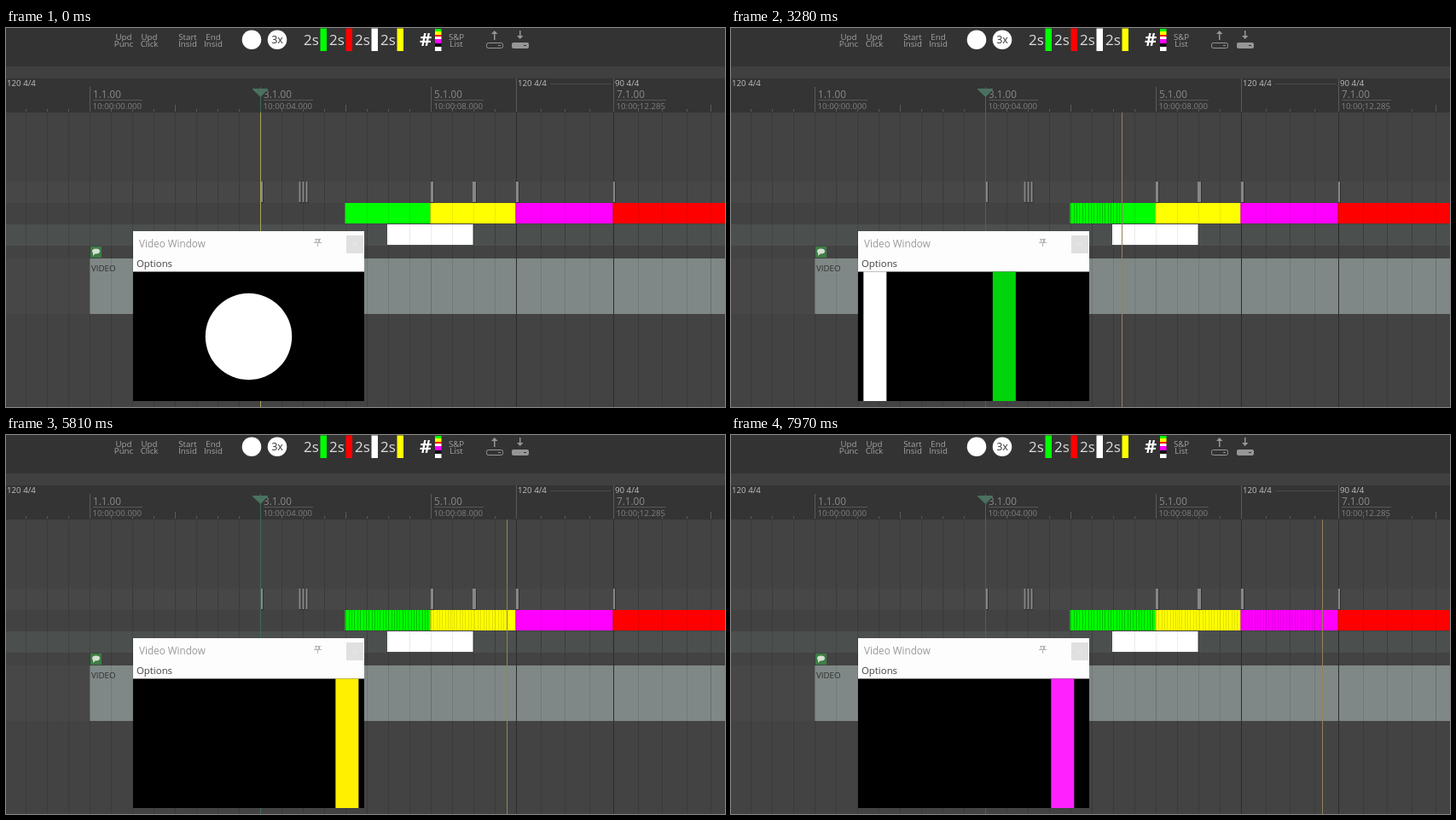
An HTML page with a canvas that plays this animation: 843x444 px, repeating every 8 s.

```html
<!DOCTYPE html>
<html>
<head>
<meta charset="utf-8">
<style>
  html, body { margin: 0; width: 100%; height: 100%; overflow: hidden; background: #434343; }
  canvas { display: block; }
</style>
</head>
<body>
<canvas id="stage" width="843" height="444"></canvas>
<script>
const ctx = document.getElementById('stage').getContext('2d');
const LOOP = 8000, FPS = 15;
const FONT = '"Open Sans", "Noto Sans", sans-serif';

function rect(x, y, w, h, color) {
  ctx.fillStyle = color;
  ctx.fillRect(x, y, w, h);
}
function disc(x, y, r, color) {
  ctx.fillStyle = color;
  ctx.beginPath();
  ctx.arc(x, y, r, 0, Math.PI * 2);
  ctx.fill();
}
function shape(points, color) {
  ctx.fillStyle = color;
  ctx.beginPath();
  points.forEach(([x, y]) => ctx.lineTo(x, y));
  ctx.fill();
}
function text(str, x, y, size, color, align = 'left', weight = 400) {
  ctx.font = `${weight} ${size}px ${FONT}`;
  ctx.textAlign = align;
  ctx.fillStyle = color;
  ctx.fillText(str, x, y);
}

// Beats are 25 px apart at 120 bpm, then 28.5 px after the tempo change.
const beats = [];
for (let i = -3; i < 20; i++) beats.push({ x: 98 + i * 25, bar: i % 4 === 0 });
for (let i = 0; i < 9; i++) beats.push({ x: Math.round(598 + i * 28.5), bar: i % 4 === 0 });

const clips = [
  [398, 100, '#00ff00'], [498, 100, '#ffff00'],
  [598, 114, '#ff00ff'], [712, 132, '#ff0000']
];
const trailColors = ['rgba(0,120,0,.45)', 'rgba(150,140,0,.28)', 'rgba(150,0,150,.25)'];
const markers = [[298, 3], [343.5, 2], [347.5, 2], [351.5, 2], [498, 3], [547, 4], [598, 3], [712, 2]];

// Streamers: active range on the timeline, left edge = x + slope * (pos - from)
const streamers = [
  { from: 398, to: 498, x: 123, slope: 2.97, color: '#00d40a' },
  { from: 447, to: 546.5, x: 117, slope: 2.97, color: '#ffffff' },
  { from: 498, to: 598, x: 122, slope: 2.97, color: '#fff000' },
  { from: 598, to: 712, x: 115, slope: 2.71, color: '#ff22ff' }
];
const punches = [[296, 301], [343, 354], [498, 502], [547, 551], [598, 602]];

// Playhead position by step, slightly uneven
const headKeys = [[0, 298], [13, 339], [15, 346], [25, 378], [38, 422], [59, 491],
  [75, 545], [77, 553], [99, 627], [115, 681], [119, 693]];
function playhead(step) {
  const i = Math.max(1, headKeys.findIndex(key => key[0] >= step));
  const [s0, x0] = headKeys[i - 1], [s1, x1] = headKeys[i];
  return Math.round(x0 + (x1 - x0) * (step - s0) / (s1 - s0));
}

function drawToolbar() {
  rect(0, 0, 843, 45, '#333333');
  rect(0, 45, 843, 14, '#404040');
  [[138, 'Upd', 'Punc'], [168, 'Upd', 'Click'], [213, 'Start', 'Insid'],
   [243, 'End', 'Insid'], [528, 'S&P', 'List']].forEach(([x, top, bottom]) => {
    text(top, x, 13.5, 9.7, '#a4a4a4', 'center');
    text(bottom, x, 22, 9.7, '#a4a4a4', 'center');
  });
  disc(288, 13.8, 11.3, '#ffffff');
  disc(318, 13.8, 11.3, '#ffffff');
  text('3x', 318, 18, 12.5, '#333333', 'center');
  ['#00ff00', '#ff0000', '#ffffff', '#ffff00'].forEach((color, i) => {
    text('2s', 349 + i * 30, 20, 17, '#dddddd');
    rect(368.5 + i * 30, 0.5, 7.5, 26.5, color);
  });
  text('#', 485, 21, 22, '#ffffff', 'left', 700);
  [[1, 4, '#00ff00'], [4, 8, '#ffff00'], [8, 10, '#ff0000'], [10, 13, '#ffffff'],
   [13, 18, '#ff00ff'], [18, 22, '#111111'], [22, 27, '#ffffff']].forEach(([a, b, color]) =>
    rect(503, a, 7.5, b - a, color));

  ctx.strokeStyle = '#969696';
  ctx.lineWidth = 1;
  ctx.beginPath();
  ctx.roundRect(563.5, 17.5, 19, 6, 2);
  ctx.stroke();
  rect(577, 20, 3, 1, '#969696');
  rect(572, 5, 1.5, 9, '#969696');
  shape([[569, 7], [572.7, 3], [576.5, 7]], '#969696');
  ctx.fillStyle = '#969696';
  ctx.beginPath();
  ctx.roundRect(593, 17, 20, 7, 2);
  ctx.fill();
  rect(607, 20, 3, 1, '#333333');
  rect(602, 3, 1.5, 9, '#969696');
  shape([[599, 9], [602.7, 13], [606.5, 9]], '#969696');
}

function drawRuler() {
  rect(0, 59, 843, 40, '#343434');
  beats.forEach(({ x, bar }) => rect(x, bar ? 90 : 95, 1, bar ? 8 : 3, '#5a5a5a'));
  [[98, '1.1.00', '10:00:00.000'], [298, '3.1.00', '10:00:04.000'],
   [498, '5.1.00', '10:00:08.000'], [712, '7.1.00', '10:00:12.285']].forEach(([x, bar, time]) => {
    rect(x, 69, 1, 29, '#5a5a5a');
    text(bar, x + 4, 82, 11.7, '#888888');
    rect(x + 4, 84, 58, 1, '#575757');
    text(time, x + 3.5, 94.5, 9.7, '#808080');
  });
  rect(598, 59, 1, 39, '#5a5a5a');
  rect(712, 59, 1, 39, '#5a5a5a');
  rect(638, 65, 71, 1, '#4b4b4b');
  [[1, '120 4/4'], [600, '120 4/4'], [714, '90 4/4']].forEach(([x, label]) =>
    text(label, x, 68, 9.7, '#c0c0c0'));
}

function drawTracks() {
  rect(0, 99, 843, 345, '#434343');
  rect(0, 180, 843, 25, '#474747');
  rect(0, 205, 843, 25, '#424242');
  rect(0, 230, 843, 25, '#4b4f4d');
  rect(0, 270, 843, 65, '#474747');
  rect(98, 270, 745, 65, '#7f8886');

  beats.forEach(({ x, bar }) => {
    rect(x, 99, 1, 106, '#3a3a3a');
    rect(x, 205, 1, 50, 'rgba(0,0,0,.12)');
    rect(x, 255, 1, 15, '#3a3a3a');
    rect(x, 270, 1, 65, bar ? 'rgba(0,0,0,.18)' : 'rgba(0,0,0,.1)');
    rect(x, 335, 1, 109, '#3a3a3a');
  });
  rect(598, 99, 1, 345, '#2c2c2c');
  rect(712, 99, 1, 345, '#2c2c2c');

  markers.forEach(([x, w]) => {
    rect(x, 180, w + 1, 25, '#303030');
    rect(x, 180, w, 24, '#868886');
  });
  clips.forEach(([x, w, color]) => rect(x - 0.5, 205, w, 24, color));
  rect(447, 230, 100.5, 24, '#ffffff');
  beats.forEach(({ x }) => {
    if (x > 398) rect(x, 205, 1, 49, 'rgba(0,0,0,.08)');
  });

  rect(99, 256, 13, 13, '#3e7d45');
  ctx.fillStyle = '#d4e0d4';
  ctx.beginPath();
  ctx.ellipse(105.5, 261.5, 4.5, 3, 0, 0, Math.PI * 2);
  ctx.fill();
  shape([[102, 263], [105, 264], [102, 267]], '#d4e0d4');
  text('VIDEO', 100, 285, 9.7, '#2a2e2d');
}

function drawHead(step) {
  const head = playhead(step);
  for (let i = 0; i < step; i++) {
    const x = playhead(i);
    const c = clips.findIndex(([left, w]) => x >= left && x < left + w - 1);
    if (c >= 0) rect(x, 205, 1, 24, trailColors[c]);
  }
  rect(298, 80, 1, 364, '#40695a');
  shape([[289, 71], [307, 71], [307, 72], [298.5, 81], [289, 72]], '#4b7160');
  rect(head, 99, 1, 345, step === 0 ? '#aaa35a' : '#94815a');
}

function drawWindow(step) {
  const pos = 296 + step * 3.345;
  rect(149, 238, 271, 199, '#000000');
  rect(149, 238, 271, 47.5, '#fdfdfd');
  text('Video Window', 156, 257, 11.7, '#999999');
  text('Options', 153, 280, 11.4, '#404040');
  rect(362, 247, 7, 1, '#b4b4b4');
  rect(363, 248, 1, 4, '#b4b4b4');
  rect(366, 248, 2, 4, '#b4b4b4');
  rect(361, 251, 9, 1, '#b4b4b4');
  rect(365, 252, 1, 4, '#b4b4b4');
  rect(399, 243, 20, 21, '#e0e0e0');
  text('×', 409, 258, 12, '#e9e9e9', 'center');

  ctx.save();
  ctx.beginPath();
  ctx.rect(149.5, 285.5, 269.5, 151.5);
  ctx.clip();
  streamers.forEach(({ from, to, x, slope, color }) => {
    if (pos >= from && pos < to) rect(x + slope * (pos - from), 285, 27, 152, color);
  });
  if (punches.some(([from, to]) => pos >= from && pos < to)) disc(284.5, 361.5, 50.7, '#ffffff');
  ctx.restore();
}

function frame() {
  const step = Math.floor(performance.now() % LOOP * FPS / 1000);
  drawToolbar();
  drawRuler();
  drawTracks();
  drawHead(step);
  drawWindow(step);
  requestAnimationFrame(frame);
}
frame();
</script>
</body>
</html>
```
